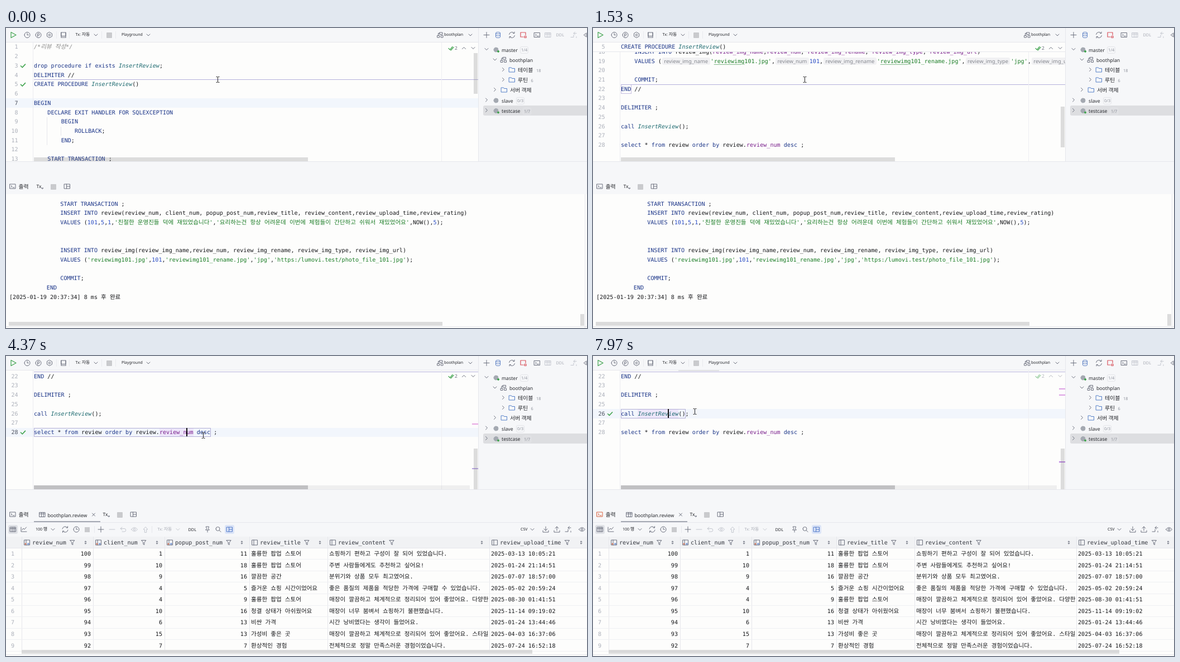
These frames come from a looping animation (1041x538 px, 8000 ms). An HTML page:

```html
<!DOCTYPE html>
<html lang="ko">
<head>
<meta charset="utf-8">
<title>SQL console</title>
<style>
html, body { margin: 0; width: 100%; height: 100%; overflow: hidden; background: #f6f7f9; }
#stage { position: relative; width: 1041px; height: 538px; overflow: hidden; text-rendering: geometricPrecision; }
#stage div, #stage svg { position: absolute; }
svg { left: 0; top: 0; overflow: visible; pointer-events: none; }
path { fill: none; stroke-linejoin: round; stroke-linecap: round; }
.ui, .code { white-space: pre; }
.ui { font-family: "Noto Sans", "Noto Sans CJK KR", sans-serif; line-height: 16px; color: #24262b; }
.code { font: 10.11px/16.73px "DejaVu Sans Mono", "Noto Sans CJK KR", monospace; color: #16171a; }
.k { font-family: "Noto Sans CJK KR", "Noto Sans CJK", sans-serif; line-height: 0; }
.ui .k { font-size: 1.14em; }
.code .k { font-size: 1.0455em; }
.c { color: #8c8c8c; font-style: italic; }
.s { color: #1b7d26; }
.w { color: #1a3488; }
.f { color: #1d6a70; font-style: italic; }
.n { color: #2a4cc4; }
.p { color: #7a1f8c; }
.h { font: 9.4px/0 "Noto Sans", sans-serif; color: #85888f; background: #f1f1f3; border-radius: 3px; padding: 0 3.4px; margin: 0 1px; }
u { text-decoration-color: #7fb886; text-underline-offset: 2px; }
.num { color: #acb0ba; }
.num.on { color: #4d5260; }
</style>
</head>
<body>
<div id="stage"></div>
<script>
const LOOP = 8000, LH = 16.73, CH = 6.083, TEXT_X = 50;
const CLICK = 2450, RUN = 3400, RESULT = 4000, CLICK2 = 6250, RUN2 = 7700;
const INK = '#6c707e', FAINT = '#c4c7cf', PAPER = '#fdfdfc', PANEL = '#f6f7f9', LINE = '#e6e7ec', GREEN = '#3fa34d';
const SEAL = '#a4a9b1';
const DB = 'boothplan';
const stage = document.getElementById('stage');

const circle = r => `M${-r} 0a${r} ${r} 0 1 0 ${2 * r} 0a${r} ${r} 0 1 0 ${-2 * r} 0`;
const FRAME = 'M-5-4H5V4H-5Z';
const ICON = {
  play: 'M-4-5L5 0L-4 5Z',
  clock: circle(5) + 'M0-3V0H2.5',
  param: circle(5) + 'M-1.3 3V-2.5H.5a1.5 1.5 0 0 1 0 3.2H-1.3',
  gear: 'M0-5L4.5-2.5V2.5L0 5L-4.5 2.5V-2.5Z' + circle(1.7),
  screen: 'M-4-4.5H4V2H-4ZM-4 4.5H4M-4-4.5V4.5M4-4.5V4.5',
  down: 'M-3-1.5L0 1.5L3-1.5',
  up: 'M-3 1.5L0-1.5L3 1.5',
  right: 'M-1.5-3L1.5 0L-1.5 3',
  plus: 'M-5 0H5M0-5V5',
  minus: 'M-5 0H5',
  refresh: 'M-5-1A5 5 0 0 1 4-3M4.5-5.5V-3H2M5 1A5 5 0 0 1-4 3M-4.5 5.5V3H-2',
  schema: 'M-5 1H-1.5V4.5H-5ZM1.5 1H5V4.5H1.5ZM-1-4.5H4V-1H-1ZM-3.5 1V-3H-1',
  base: 'M-4.5-3.5a4 1.6 0 0 1 8 0a4 1.6 0 0 1-8 0V3.5a4 1.6 0 0 0 8 0V-3.5M-4.5 0a4 1.6 0 0 0 8 0',
  plug: 'M4 0V-4.5H-5V3.5H0M2 2H5V5H2Z',
  console: FRAME + 'M-3-1.5L-1 0L-3 1.5M0 2H3',
  table: FRAME + 'M-5-1.5H5M-1.5-4V4M2-4V4',
  layout: FRAME + 'M-1-4V4M-1 0H5',
  swap: 'M-5 4H0V0M5-3H0M2.5-5.5L0-3L2.5-.5M5 3V5',
  eye: 'M-5.5 0Q0-7 5.5 0Q0 7-5.5 0Z' + circle(1.7),
  folder: 'M-5-4H-1L0-2.5H5V4H-5Z',
  filter: 'M-4-4H4L1 0V4L-1 3V0Z',
  sort: 'M-1.2-1.5L0-2.7L1.2-1.5ZM-1.2 1.5L0 2.7L1.2 1.5Z',
  column: 'M-5-4.5H4.5V4.5H-5ZM-2-4.5V4.5',
  chart: 'M-5-4V4H5M-3 1L-1-2L1 0L4.5-4',
  undo: 'M-2-4L-5-1.5L-2 1M-5-1.5H2a2.5 2.5 0 0 1 0 5.5H-2',
  send: 'M-1.7 5V0H-4L0-4.5L4 0H1.7V5Z',
  pin: 'M-2.5-5H2.5L1.5-1L3.5 1H-3.5L-1.5-1ZM0 1V5',
  find: 'M-4.5-1a3.5 3.5 0 1 0 7 0a3.5 3.5 0 1 0-7 0M1.7 1.7L4.5 4.5',
  load: 'M0-5V2M-3-1L0 2L3-1M-5 2V5H5V2',
  save: 'M0 2V-5M-3-2L0-5L3-2M-5 2V5H5V2',
  close: 'M-2.5-2.5L2.5 2.5M2.5-2.5L-2.5 2.5',
  check: 'M-4 0L-1.2 2.8L4-2.8',
  target: circle(4.5) + 'M0-6V-2M0 2V6M-6 0H-2M2 0H6',
  dots: 'M0-4V-4M0 0V0M0 4V4',
  beam: 'M-2.5-5H-.8L0-4.2L.8-5H2.5M0-4.2V4.2M-2.5 5H-.8L0 4.2L.8 5H2.5',
  arrow: 'M0-5V5L2.3 3L4 6.5L5.5 5.8L4 2.5H7Z'
};

function box(parent, x, y, w, h, bg = 'transparent', css = '') {
  const el = document.createElement('div');
  el.style.cssText = `left:${x}px;top:${y}px;width:${w}px;height:${h}px;background:${bg};${css}`;
  parent.append(el);
  return el;
}
const ko = s => s.replace(/[가-힣]+/g, m => `<span class="k">${m}</span>`);
function label(parent, x, y, text, size = 8.7, color = '#24262b') {
  const el = box(parent, x, y - 7.2, 'auto', 16, 'transparent', `font-size:${size}px;color:${color}`);
  el.className = 'ui';
  el.innerHTML = ko(text);
  return el;
}
// Rows are given by their top edge; the text sits slightly below the middle.
function code(parent, x, top, html, css = '') {
  const el = box(parent, x, top + 1.4, 'auto', LH, 'transparent', css);
  el.className = 'code';
  el.innerHTML = html;
  return el;
}
const NS = 'http://www.w3.org/2000/svg';
function layer(parent) {
  const el = document.createElementNS(NS, 'svg');
  el.setAttribute('width', 1041);
  el.setAttribute('height', 538);
  parent.append(el);
  return el;
}
function icon(svg, name, x, y, color = INK, width = 1) {
  const el = document.createElementNS(NS, 'path');
  el.setAttribute('d', ICON[name] || name);
  el.setAttribute('transform', `translate(${x} ${y})`);
  el.style.cssText = `stroke:${color};stroke-width:${width}`;
  svg.append(el);
  return el;
}
const show = (el, on) => { el.style.display = on ? '' : 'none'; };

const TOKEN = /(\/\*.*?\*\/)|('[^']*')|\{(\w+)\}|\b(drop|procedure|if|exists|delimiter|create|begin|end|declare|exit|handler|for|sqlexception|rollback|start|transaction|insert|into|values|commit|call|select|from|order|by|desc)\b|\b(InsertReview)\b|\b(\d+)\b|\b(client_num|popup_post_num|review_(?!img\()\w+)/gi;
function paint(src, rich = true) {
  return src.replace(TOKEN, (m, ...g) => {
    const kind = 'cshwfnp'[g.slice(0, 7).findIndex(Boolean)];
    if (kind === 'p' && !rich) return m;
    let text = kind === 'h' ? g[2] : ko(m);
    if (kind === 's' && rich) text = text.replace('reviewimg', '<u>reviewimg</u>');
    return `<span class="${kind}">${text}</span>`;
  });
}

const COLS = 'review_num, client_num, popup_post_num,review_title, review_content,review_upload_time,review_rating';
const IMG_COLS = 'review_img_name,review_num, review_img_rename, review_img_type, review_img_url';
const TITLE = "'친절한 운영진들 덕에 재밌었습니다'";
const BODY = "'요리하는건 항상 어려운데 이번에 체험들이 간단하고 쉬워서 재밌었어요'";
const LINK = "'https:/lumovi.test/photo_file_101.jpg'";
const bare = s => s.replace(/\{\w+\}/g, '');
const INSERTS = [
  'START TRANSACTION ;',
  `INSERT INTO review(${COLS})`,
  `VALUES ({review_num}101,{client_num}5,{popup_post_num}1,{review_title}${TITLE},{review_content}${BODY},NOW(),5);`,
  '', '',
  `INSERT INTO review_img(${IMG_COLS})`,
  `VALUES ({review_img_name}'reviewimg101.jpg',{review_num}101,{review_img_rename}'reviewimg101_rename.jpg',{review_img_type}'jpg',{review_img_url}${LINK});`,
  '', 'COMMIT;'
];
const SCRIPT = [
  '/*리뷰 작성*/', '', 'drop procedure if exists InsertReview;', 'DELIMITER //',
  'CREATE PROCEDURE InsertReview()', '', 'BEGIN',
  '    DECLARE EXIT HANDLER FOR SQLEXCEPTION', '        BEGIN', '            ROLLBACK;', '        END;', '',
  ...INSERTS.map(s => s && '    ' + s),
  'END //', '', 'DELIMITER ;', '', 'call InsertReview();', '',
  'select * from review order by review.review_num desc ;'
];

// Editor
const rowTop = n => (n - 1) * LH;
const editor = box(stage, 0, 26, 846, 213, PAPER, 'overflow:hidden');
const doc = box(editor, 0, 0, 846, 600);
const current = box(doc, 0, 0, 846, LH, '#f2f6fc');
box(editor, 48, 0, 1, 213, '#ebecf0');
box(editor, 780, 0, 1, 213, '#eeeef2');
const usage = box(doc, 0, 1, 0, LH - 2, '#ede6fa');
const selection = box(doc, TEXT_X, rowTop(28), 52 * CH, LH, '#c6bff0');
const frame = box(doc, TEXT_X - .5, 0, 0, LH - 2, 'transparent', 'border:1px solid #b3afd6');
const endFrame = box(doc, TEXT_X - .5, rowTop(22), 17, LH - 2, 'transparent', 'border:1px solid #c5bde0');
box(doc, 73, rowTop(9), 1, 3 * LH, '#e6e6ec');
box(doc, 98, rowTop(10), 1, LH, '#e6e6ec');
for (const n of [5, 22]) box(doc, TEXT_X, rowTop(n) - .8, 796, 1, '#b5b1dc');
const NUM_CSS = 'width:21.7px;text-align:right';
const numbers = SCRIPT.map((src, i) => {
  code(doc, TEXT_X, rowTop(i + 1), paint(src));
  const el = code(doc, 0, rowTop(i + 1), i + 1, NUM_CSS);
  el.classList.add('num');
  return el;
});
const docArt = layer(doc);
const tick = n => icon(docArt, 'check', 30.5, rowTop(n) + 8.5, GREEN, 1.6);
tick(3); tick(5);
const tick26 = tick(26), tick28 = tick(28);
const bulb = icon(docArt, circle(3.6) + 'M-1.4 5H1.4', 60.5, rowTop(27) + 4.5, '#e0a02c');
bulb.style.fill = '#f5b63c';
const caret = box(doc, 0, 0, 2, LH - 1, '#111');

const sticky = box(editor, 0, 0, 846, 16, PAPER, `border-bottom:1px solid ${LINE}`);
code(sticky, TEXT_X, 0, paint(SCRIPT[4]));
code(sticky, 0, 0, 5, NUM_CSS).classList.add('num');

const marks = [
  [95, '#e7a6e2', CLICK, CLICK2], [175, '#9b9ba8', CLICK, RESULT], [175, '#b8a4e2', RESULT, CLICK2],
  [32, '#dca0e4', CLICK2, LOOP], [43, '#dca0e4', CLICK2, LOOP], [163, '#b77be0', CLICK2, LOOP]
].map(([y, color, from, to]) => ({ el: box(editor, 835, y, 11, 2, color), from, to }));
const vThumb = box(editor, 838, 0, 7, 73, 'rgba(120,120,125,.25)');
const hTrack = box(editor, TEXT_X, 206, 781, 7, 'rgba(120,120,125,.1)');
const hThumb = box(editor, TEXT_X, 206, 491, 7);
const inspect = box(editor, 0, -26, 846, 46);
const inspectArt = layer(inspect);
icon(inspectArt, 'M-4 0L-1.5 2.5L3-3M0 3.5L5-2', 797, 36.5, GREEN, 1.2);
label(inspect, 804, 36, '2', 8.5, INK);
icon(inspectArt, 'up', 820.5, 36);
icon(inspectArt, 'down', 837, 36);

// Toolbars and tree
const art = layer(stage);
box(stage, 0, 25, 846, 1, LINE);
box(stage, 846, 0, 1, 239, LINE);
box(stage, 0, 239, 1041, 1, LINE);
const busy = box(stage, 153, 25, 73, 2, '#dcdde1');
const icons = (svg, y, list) => list.forEach(([name, x, color, w]) => icon(svg, name, x, y, color, w));
icons(art, 12.5, [
  ['play', 13, GREEN, 1.2], ['clock', 38], ['param', 58], ['gear', 78], ['screen', 103],
  ['down', 161], ['down', 255], ['schema', 778], ['down', 832],
  ['plus', 861], ['base', 882, '#5b7fc4'], ['refresh', 906.5], ['plug', 927, '#d8525c', 1.2],
  ['console', 951.5], ['table', 971, FAINT], ['swap', 1017, FAINT], ['eye', 1041]
]);
for (const x of [90, 113, 171, 196]) box(stage, x, 6, 1, 13, '#e9eaee');
box(stage, 180, 8, 10, 10, '#c9cacd', 'border-radius:1px');
label(stage, 124.5, 12, 'Tx: 자동', 7);
label(stage, 207, 12, 'Playground', 7);
label(stage, 785, 12, DB, 7);
label(stage, 985.5, 12, 'DDL', 7.3, '#a9acb5');

box(stage, 855, 139, 186, 18, '#dddee1', 'border-radius:3px 0 0 3px');
stage.append(art);
const tree = [
  [39, 861, 'down', 'server', 888, 'master', '1/4', 922], [57.5, 876, 'down', 'schema', 902, DB],
  [75.5, 891, 'right', 'folder', 917, '테이블', '18', 949], [93.5, 891, 'right', 'folder', 917, '루틴', '6', 939.5],
  [111.5, 876, 'right', 'folder', 903, '서버 객체'],
  [130, 861, 'right', 'server', 888, 'slave', '0/3', 915], [148.5, 861, 'right', 'server', 888, 'testcase', '1/7', 927]
];
for (const [y, x, arrow, kind, tx, name, note, nx] of tree) {
  icon(art, arrow, x, y - 1);
  if (kind === 'server') {
    icon(art, circle(4), 878, y, SEAL).style.fill = SEAL;
    if (name !== 'slave') icon(art, circle(1.5), 882, y + 3, GREEN).style.fill = GREEN;
    box(stage, nx - 1, y - 6, 15, 13, 'transparent', 'border:1px solid #e4e5e9;border-radius:3px;box-sizing:border-box');
  } else icon(art, kind, tx - 10.5, y - .5, kind === 'folder' ? '#5580c8' : INK);
  label(stage, tx, y, name);
  if (note) label(stage, nx + 1, y + .5, note, 7.3, '#8f939d');
}

// Lower panel: header, log and result grid
const outIcon = icon(art, 'console', 12, 284);
label(stage, 22.5, 284.5, '출력');
const hoverTools = layer(stage);
icon(hoverTools, 'target', 1011.5, 256);
icon(hoverTools, 'dots', 1031.5, 256, INK, 1.6);
function panelTools(parent, svg, x) {
  label(parent, x, 284, 'Tx', 8.5);
  icon(svg, 'M-1.5 0H1.5L0 1.5Z', x + 11, 287);
  box(parent, x + 25.5, 279.5, 10, 10, '#c9cacd', 'border-radius:1px');
  icon(svg, 'layout', x + 55, 284);
}

const log = box(stage, 0, 0, 1041, 538);
box(log, 0, 298, 1041, 240, PAPER);
box(log, 1037, 298, 1, 240, LINE);
box(log, 0, 535, 1041, 1, LINE);
const logArt = layer(log);
panelTools(log, logArt, 54.5);
[...INSERTS, 'END'].forEach((src, i) =>
  code(log, 6, 307.1 + i * LH, ' '.repeat(i < 9 ? 15 : 11) + paint(bare(src), false)));
code(log, 6, 307.1 + 10 * LH, ko('[2025-01-19 20:37:34] 8 ms 후 완료'));
box(log, 5, 527, 777, 7, 'rgba(120,120,125,.25)');
box(log, 1029, 513, 7, 21, 'rgba(120,120,125,.25)');
const spinner = layer(log);
const spokes = Array.from({ length: 8 }, (_, i) => {
  const a = i * Math.PI / 4, c = Math.cos(a), s = Math.sin(a);
  return icon(spinner, `M${5 * c} ${5 * s}L${9 * c} ${9 * s}`, 517, 416, '#85878d', 2.4);
});

const grid = box(stage, 0, 0, 1041, 538);
box(grid, 0, 298, 1041, 26, PANEL);
box(grid, 0, 324, 1041, 21, '#f1f2f4', `border-bottom:1px solid ${LINE};box-sizing:border-box`);
box(grid, 0, 345, 1041, 193, PAPER);
box(grid, 0, 298, 1041, 1, LINE);
box(grid, 50, 296, 119, 2, '#a4a8b3');
box(grid, 4, 303, 17, 16, '#dfe1e6', 'border-radius:3px');
box(grid, 392, 303, 17, 16, '#dbe4f7', 'border-radius:3px');
const gridArt = layer(grid);
icon(gridArt, 'table', 65, 284.5);
label(grid, 74.5, 285.5, DB + '.review');
icon(gridArt, 'close', 157, 284.5);
panelTools(grid, gridArt, 173.5);
icons(gridArt, 311, [
  ['table', 12.5], ['chart', 32], ['down', 84], ['refresh', 106], ['clock', 126], ['plus', 170],
  ['minus', 190, FAINT], ['undo', 210, FAINT], ['eye', 230, FAINT], ['send', 250, FAINT], ['down', 308, FAINT],
  ['pin', 361], ['find', 380.5], ['layout', 400.5, '#4f78c8'], ['down', 943], ['load', 967], ['save', 987],
  ['swap', 1007], ['eye', 1032]
]);
box(grid, 141, 306.5, 9, 9, '#c9cacd');
for (const x of [158, 261]) box(grid, x, 305, 1, 12, LINE);
label(grid, 53, 311, '100 행', 7);
label(grid, 271.5, 311, 'Tx: 자동', 7, '#a9acb5');
label(grid, 326.5, 311, 'DDL', 7.3);
label(grid, 922, 311, 'CSV', 7);

const FIELDS = [['review_num', 28], ['client_num', 156], ['popup_post_num', 284], ['review_title', 436],
  ['review_content', 576], ['review_upload_time', 866], ['', 1044]];
const NICE = '훌륭한 팝업 스토어', TIDY = '매장이 깔끔하고 체계적으로 정리되어 있어 좋았어요. ';
const ROWS = [
  [1, 11, NICE, '쇼핑하기 편하고 구성이 잘 되어 있었습니다.', '03-13 10:05:21'],
  [10, 18, NICE, '주변 사람들에게도 추천하고 싶어요!', '01-24 21:14:51'],
  [9, 16, '깔끔한 공간', '분위기와 상품 모두 최고였어요.', '07-07 18:57:00'],
  [4, 5, '즐거운 쇼핑 시간이었어요', '좋은 품질의 제품을 적당한 가격에 구매할 수 있었습니다.', '05-02 20:59:24'],
  [4, 9, NICE, TIDY + '다양한', '08-30 01:41:51'],
  [10, 16, '청결 상태가 아쉬웠어요', '매장이 너무 붐벼서 쇼핑하기 불편했습니다.', '11-14 09:19:02'],
  [6, 13, '비싼 가격', '시간 낭비였다는 생각이 들었어요.', '01-24 13:44:46'],
  [15, 13, '가성비 좋은 곳', TIDY + '스타일', '04-03 16:37:06'],
  [7, 7, '환상적인 경험', '전체적으로 정말 만족스러운 경험이었습니다.', '07-24 16:52:18']
];
const ROW_H = 20.56;
FIELDS.slice(0, 6).forEach(([name, x], i) => {
  const next = FIELDS[i + 1][1];
  box(grid, x, 324, 1, 203, LINE);
  icon(gridArt, 'column', x + 10, 334.5);
  if (i < 3) {
    icon(gridArt, circle(1.2), x + 12, 337, '#4f78c8');
    icon(gridArt, circle(1), x + 7, 337, '#d8603f');
  }
  code(grid, x + 19, 326.2, name, 'color:#34373f');
  icon(gridArt, 'filter', x + 30 + name.length * CH, 334.5);
  icon(gridArt, 'sort', next - 13.5, 334.5);
});
ROWS.forEach((row, r) => {
  const top = 344.8 + r * ROW_H;
  box(grid, 0, top + ROW_H - 1, 1041, 1, '#eff0f3');
  code(grid, 9, top + 1.9, r + 1, 'color:#acb0ba');
  [100 - r, ...row].forEach((value, c) => {
    const x = FIELDS[c][1] + 3, w = FIELDS[c + 1][1] - x - (c < 3 ? 4 : 0);
    const text = c === 5 ? '2025-' + value : String(value);
    code(grid, x, top + 1.9, ko(text), `width:${w}px;overflow:hidden;text-align:${c < 3 ? 'right' : 'left'}`);
  });
});
box(grid, 28, 527, 915, 7, 'rgba(120,120,125,.25)');
box(grid, 0, 535, 1041, 1, LINE);

// Pointer
const pointer = layer(stage);
const beam = icon(pointer, 'beam', 0, 0, '#222');
const arrow = icon(pointer, 'arrow', 0, 0, '#222', .9);
arrow.style.fill = '#fff';

const SCROLL = [[0, 0], [300, 0], [900, 196], [1350, 196], [1700, 348.7], [LOOP, 348.7]];
const POINTER = [[0, 379.5, 92.5], [1700, 379.5, 92.5], [2400, 381.5, 116.5], [3370, 381.5, 116.5], [3600, 384.5, 114],
  [4200, 384.5, 114], [5000, 121.5, 356], [5450, 121.5, 356], [6200, 182.5, 99.5], [LOOP, 182.5, 99.5]];
function track(keys, t) {
  const i = Math.max(1, keys.findIndex(k => t < k[0]));
  const a = keys[i - 1], b = keys[i], u = (t - a[0]) / (b[0] - a[0]), e = u * u * (3 - 2 * u);
  return a.slice(1).map((v, j) => v + (b[j + 1] - v) * e);
}

function render(t) {
  const [scroll] = track(SCROLL, t), [px, py] = track(POINTER, t);
  const line = t < CLICK ? 7 : t < CLICK2 ? 28 : 26;
  const selected = t >= RUN && t < RESULT, done = t >= RESULT, last = line === 26;

  doc.style.top = -Math.round(scroll) + 'px';
  show(sticky, scroll > 4 * LH && scroll < 335);
  vThumb.style.top = 19 + scroll * .347 + 'px';
  hThumb.style.background = `rgba(110,110,115,${done ? .36 : .23})`;
  show(hTrack, done);

  current.style.top = rowTop(line) + 'px';
  numbers.forEach((el, i) => el.classList.toggle('on', i + 1 === line));
  show(selection, selected);
  show(endFrame, t < CLICK + 120);
  show(usage, line > 7 && !selected);
  usage.style.left = TEXT_X + (last ? 5 : 37) * CH + 'px';
  usage.style.width = (last ? 12 : 10) * CH + 'px';
  usage.style.top = rowTop(line) + 1 + 'px';
  show(frame, done);
  frame.style.top = rowTop(line) + 'px';
  frame.style.width = (last ? 19 : 52) * CH - 1 + 'px';

  const since = t - (t >= RUN2 ? RUN2 : last ? CLICK2 : done ? RESULT : CLICK);
  show(caret, line > 7 && !selected && since % 1000 < 500);
  caret.style.left = TEXT_X + (last ? 14 : 45) * CH - 1 + 'px';
  caret.style.top = rowTop(line) + 'px';

  show(tick28, done && t < RUN2);
  show(tick26, t >= RUN2);
  show(bulb, t >= 4400 && t < CLICK2);
  marks.forEach(m => show(m.el, t >= m.from && t < m.to));
  inspect.style.opacity = t >= RUN2 ? .5 : 1;
  show(busy, t >= RUN2);
  outIcon.style.stroke = t >= RUN2 ? '#d9623f' : INK;

  show(log, !done);
  show(grid, done);
  show(spinner, t >= RUN + 120);
  const phase = Math.floor(t / 100);
  spokes.forEach((el, i) => { el.style.opacity = .25 + .55 * ((i - phase % 8 + 8) % 8) / 7; });

  const below = py > 240;
  show(hoverTools, below);
  show(beam, !below);
  show(arrow, below);
  for (const el of [beam, arrow]) el.setAttribute('transform', `translate(${px} ${py})`);
}

const start = performance.now();
function tickFrame() {
  render((performance.now() - start) % LOOP);
  requestAnimationFrame(tickFrame);
}
tickFrame();
</script>
</body>
</html>
```
